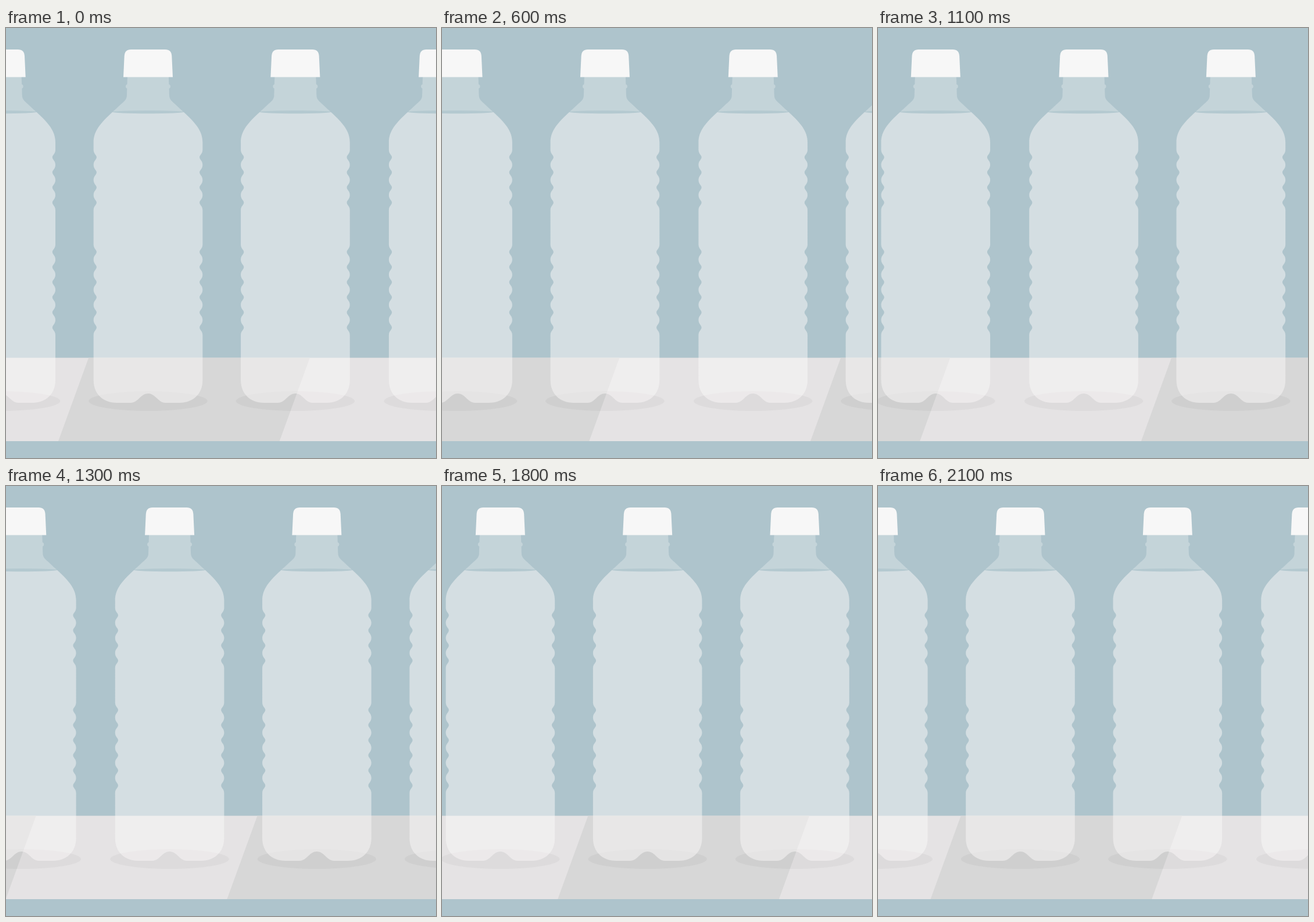
An HTML page for the animation above (2200 ms loop, 740 by 740 pixels).

```html
<!DOCTYPE html>
<html>
<head>
<meta charset="utf-8">
<title>Bottles on a belt</title>
<style>
  html, body { margin: 0; width: 100%; height: 100%; overflow: hidden; background: #aec4cc; }
  svg { display: block; width: 100%; height: 100%; }
</style>
</head>
<body>
<svg viewBox="0 0 740 740">
  <defs>
    <clipPath id="below"><rect x="-120" y="144.8" width="240" height="520"/></clipPath>
    <path id="body"/>
    <g id="bottle">
      <ellipse cy="642" rx="102.3" ry="17" opacity=".035"/>
      <use href="#body" fill="#fafafa" fill-opacity=".28"/>
      <use href="#body" fill="#f8f3f4" fill-opacity=".3" clip-path="url(#below)"/>
      <ellipse cy="144.6" rx="61.5" ry="2.6" fill="#b4c9d0"/>
      <path fill="#f7f7f7" d="M-42.5 84.4L-40.8 48Q-40 37-29.5 37H29.5Q40 37 40.8 48L42.5 84.4Z"/>
    </g>
  </defs>
  <rect y="567.5" width="740" height="143.5" fill="#e5e3e4"/>
  <g id="belt"></g>
</svg>
<script>
const PERIOD = 761.5, STEP = 36.24, FRAME = 100, LOOP = 2200;

// Right half of the outline as one chain of cubic points, neck to base.
const pts = [[35.5, 84]];
const curve = (...p) => pts.push(...p);
const line = (x, y) => curve(pts[pts.length - 1], [x, y], [x, y]);
const W = 93.8, DENT = W - 5.2;

function ribs(first, count) {
  line(W, first - 13);
  for (let i = 0; i < count; i++) {
    const y = first + 26 * i;
    curve([W, y - 6], [DENT, y - 4], [DENT, y]);
    curve([DENT, y + 4], [W, y + 6], [W, y + 13]);
  }
}

line(36, 97);
curve([39.3, 97.5], [39.3, 103.5], [36.2, 104]);
line(36.5, 115);
curve([36.5, 120], [38, 123], [41, 126]);
line(61, 144.5);
curve([82, 164], [W, 177], [W, 197]);
ribs(222.5, 4);
ribs(385.5, 6);
line(W, 606);
curve([W, 630], [77, 645], [54, 645]);
line(30, 645);
curve([17, 645], [13, 629], [0, 629]);

const chain = p => p[0] + 'C' + p.slice(1).join(' ');
const left = pts.map(([x, y]) => [-x, y]).reverse();
document.getElementById('body').setAttribute('d', `M${chain(pts)}L${chain(left)}Z`);

const belt = document.getElementById('belt');
const tiles = [-1, 0, 1].map(k => k * PERIOD);
const panels = tiles.map(x =>
  `<path transform="translate(${x})" fill="#d7d7d7" d="M142.2 567.5h380.7L470.7 711H90Z"/>`);
const bottles = tiles.flatMap(x => [244.5, 497.9, 752.7].map(c =>
  `<use href="#bottle" x="${x + c}"/>`));
belt.innerHTML = panels.join('') + bottles.join('');

function draw() {
  const n = Math.floor(performance.now() % LOOP / FRAME);
  belt.setAttribute('transform', `translate(${-n * STEP})`);
  requestAnimationFrame(draw);
}
draw();
</script>
</body>
</html>
```
